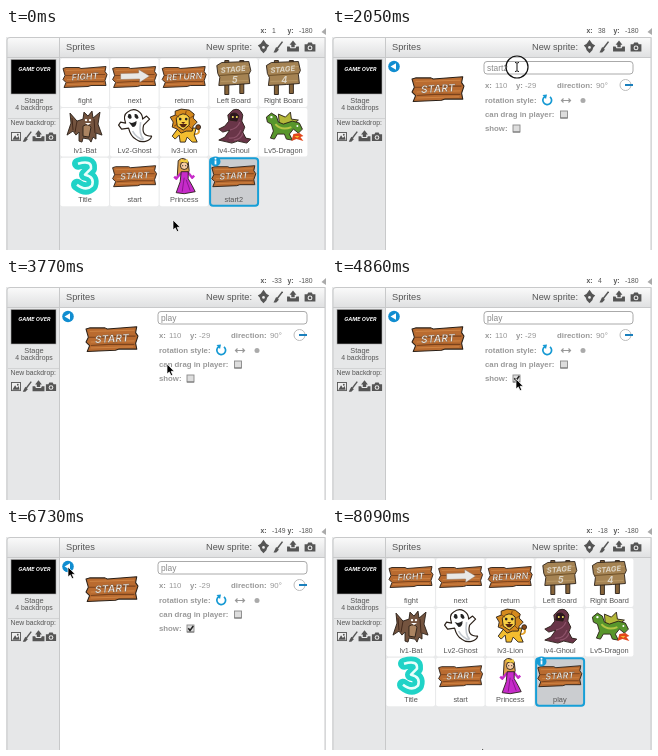
Write an HTML page that moves like this. It is 320 px wide and 222 px high and loops after 8.13 s.

```html
<!DOCTYPE html>
<html lang="en">
<head>
<meta charset="utf-8">
<title>Renaming a sprite</title>
<style>
html,body{margin:0;width:100%;height:100%;overflow:hidden;background:#fff}
svg{display:block;width:100vw;height:100vh;font:7.4px 'Liberation Sans',Arial,sans-serif;fill:#555}
.mid{text-anchor:middle}
.b{font-weight:bold}
.hand{font-family:Inter,sans-serif;font-weight:700;font-style:italic;text-anchor:middle}
.dim{font-size:7.8px;fill:#999}
.top{font-size:6.8px}
.art{stroke:#2a2018;stroke-width:.9;stroke-linejoin:round}
</style>
</head>
<body>
<svg id="stage" viewBox="0 0 320 222"></svg>
<script>
const LOOP = 8130;
const at = (x, y, body, k = 1) => `<g transform="translate(${x} ${y}) scale(${k})">${body}</g>`;
const text = (x, y, s, attrs = '') => `<text x="${x}" y="${y}" ${attrs}>${s}</text>`;
const rect = (x, y, w, h, attrs = '') => `<rect x="${x}" y="${y}" width="${w}" height="${h}" ${attrs}/>`;
const path = (d, fill, attrs = '') => `<path d="${d}" fill="${fill}" ${attrs}/>`;
const dot = (x, y, r, fill, attrs = '') => `<circle cx="${x}" cy="${y}" r="${r}" fill="${fill}" ${attrs}/>`;
const line = (d, color, width = 1) => path(d, 'none', `stroke="${color}" stroke-width="${width}"`);
const art = body => `<g class="art">${body}</g>`;

// Wooden boards
const plank = art(path('M-22-8L-19-9-6-9-4-8 21-10 20-5 22-2 20 4 21 9 6 9 3 10-21 11-19 6-22 3-20-1Z', '#b96b30')) +
  line('M-20-1L-6-1 5-2 20-2M-18 6L-3 5 19 5', '#7b431c', .9) +
  line('M-19-6L19-7M-18 3L19 2M-18 8L18 7', '#d58a48', .7);
const sign = word => plank + text(0, 3.2, word, 'class="hand" font-size="8.8" fill="#eeeae4" stroke="#6b4a30" stroke-width=".3" transform="rotate(-3)"');
const arrowSign = plank + path('M-14-3L4-3.5V-7L15-.5 5 6V2.5L-14 3Z', '#e8e8e6', 'stroke="#8c6b52" stroke-width=".5"');
const board = n => art(rect(-9, -16, 4, 34, 'fill="#86643a"') + rect(6, -16, 4, 33, 'fill="#86643a"') +
  path('M-17-11L-12-14 15-15 17-6 15-2 16 7 3 8-15 9-14 1-16-3Z', '#a58353')) +
  line('M-15-1L15-3', '#6d5029') + line('M-14-8L15-10M-13 5L14 4', '#bd9c69', .8) +
  text(0, -4.5, 'STAGE', 'class="hand" font-size="7.5" fill="#ddd5c6" transform="rotate(-5)"') +
  text(1, 6.5, n, 'class="hand" font-size="9" fill="#ddd5c6"');

// Characters, each drawn around its own centre
const bat = art(path('M-2-7L-8-5-15-13-14-3-18 9-12 5-9 9-6 6-6 15-3 16-2 12 4 13 6 16 8 11 11 13 11 7 17 9 13-2 15-14 8-8 7-15 3-10-1-14Z', '#74543f') +
  path('M-2 0Q3-3 6 1L4 11-2 10Z', '#ab8461')) +
  line('M-8-5L-10 6M9-7L10 7M-13-8L-12 4', '#43291c') +
  dot(1, -6, 1.2, '#fff') + dot(5, -6, 1.2, '#fff') + path('M0-3H6L3-1Z', '#fff');
const ghost = art(path('M-7-14C0-20 8-14 8-7L12-10 15-7 9-1C7 7 10 10 17 10 16 15 7 18 1 13-4 10-5 6-6 2L-13 3-16-1-14-4-9-3C-11-8-10-12-7-14Z', '#fff', 'stroke-width="1.2"')) +
  path('M-6-12q3-1 3 4-2 2-4-1zM0-12q3-1 4 4-2 2-4-1zM-6-4q4 2 8-1 0 6-4 6z', '#222') +
  line('M6-4Q4 8 9 13M-2 5Q2 12 9 14', '#c3c8ce', 1.6);
const lion = art(line('M8 8Q17 9 14 2', '#e0a02a', 2) + dot(14, 1, 2.4, '#8b4a16') +
  path('M-6 2L-12 10-9 13-5 9-4 16 1 16 3 11 8 16 13 16 10 9 12 2Z', '#f3bd2f') +
  path('M-3-17L5-16 10-12 9-8 13-4 9 0 8 5 2 5-3 7-7 3-12 1-11-4-14-9-9-11-9-15Z', '#d58a1d') +
  path('M-8-8Q-1-16 5-9L5-1-1 4-7 0Z', '#f8cf45')) +
  line('M-9-11L-5-9M2-15L1-11M10-11L6-8M-10 0L-7-2M8 3L5 0', '#7d4512') +
  dot(-4, -7, 1.3, '#222') + dot(2, -7, 1.3, '#222') + path('M-3-4H1L-1-2ZM-5-2Q-1 5 3-2Z', '#552611');
const ghoul = art(path('M-1-16Q6-19 9-11L8-5 11 1 9 6 12 12 17 13 13 17 4 15-2 17-15 14-9 11-4 4-11 6-15 3-9 0-5-5-6-11Z', '#693548') +
  path('M-3-12Q2-15 5-10L3-5-4-6Z', '#2c151e')) +
  line('M-4 4Q4 2 6-4M-5 12Q4 13 7 4M0 14Q8 13 9 7', '#8d5269', 1.3) +
  dot(-1, -9, 1, '#f2e25f') + dot(3, -9, 1, '#f2e25f');
const dragon = art(path('M-4-1L-5-12 2-9 7-14 8-7 15-6 5 2Z', '#b5b83a') +
  path('M-17-9L-12-13-7-10-5-4 0-2 9-5 16-3 19 3 15 7 10 3 6 8 9 14 3 13 1 8-6 8-9 13-13 12-10 5-12-2-16-4Z', '#58962c')) +
  line('M-8-2Q-2 5 8 1', '#b6c544', 2) + dot(-12, -9, 1.2, '#fff') + dot(14, 0, 1, '#fff') +
  path('M10 8L16 7 20 10 17 11 20 15 13 13 8 15Z', '#e2481c') + path('M11 10L16 10 14 12Z', '#f8b52b');
const curve = 'M-7-12Q7-16 6-7L0-1Q10 1 7 10 1 16-8 9';
const three = path(curve, 'none', 'stroke="#20d3c7" stroke-width="12" stroke-linejoin="round" stroke-linecap="round"') +
  path(curve, 'none', 'stroke="#e9fffc" stroke-width="2.6" stroke-linejoin="round"');
const princess = art(path('M-6-15Q-1-20 4-14L5-5 3 0-4-2-7 2Z', '#dca04b') +
  line('M-3-3L-8 3-10 1M4-3L8 2 10 0', '#c62bc9', 2.4) + path('M-3-4H4L4 3 8 10 11 16 0 18-8 17-4 6Z', '#c62bc9') +
  dot(0, -10, 3.8, '#f7cda4')) +
  path('M-4-14L-3-17 0-15 3-17 4-13Z', '#f2cf3c') + dot(-1.5, -10, .6, '#333') + dot(1.5, -10, .6, '#333') +
  line('M0 2L-2 16M2 4L6 15', '#8b168f', 1);

// Small grey tool icons
const elf = path('M0-7L3-3 6-1 4 1 3 4 0 7-3 4-4 1-6-1-3-3Z', '#555') + dot(0, 1, 1.4, '#eee');
const brush = line('M5-6L-1 2', '#555', 1.7) + path('M-2 0L1 3-2 6-5 6Z', '#555');
const upload = path('M-7 0H-4L-3 2H3L4 0H7V6H-7ZM-2 1V-2H-4L0-7 4-2H2V1Z', '#555');
const camera = path('M-6-3H-3L-2-5H2L3-3H6V5H-6Z', '#555') + dot(0, 1, 2.7, '#eee') + dot(0, 1, 1.5, '#555');
const picture = rect(-5, -5, 10, 9, 'fill="#eee" stroke="#555"') + path('M-4 3L-1-2 1 1 3-1 4 3Z', '#555') + dot(2, -2.5, 1, '#555');
const badge = dot(0, 0, 5, '#159bd5') + rect(-.9, -1.1, 1.8, 4, 'fill="#fff"') + dot(0, -2.7, 1, '#fff');

const sprites = [
  ['fight', sign('FIGHT')], ['next', arrowSign], ['return', sign('RETURN')], ['Left Board', board(5)], ['Right Board', board(4)],
  ['lv1-Bat', bat], ['Lv2-Ghost', ghost], ['lv3-Lion', lion], ['lv4-Ghoul', ghoul], ['Lv5-Dragon', dragon],
  ['Title', three], ['start', sign('START')], ['Princess', princess], ['', sign('START')]
];
const tiles = sprites.map(([name, body], i) => {
  const x = 79 + i % 5 * 49.6, y = 31 + (i / 5 | 0) * 49.6, chosen = i === 13;
  const box = chosen
    ? rect(x - 23.7, y, 48, 47.5, 'rx="3" fill="#cbcdd0" stroke="#179fd7" stroke-width="2"')
    : rect(x - 24.5, y - .5, 48.5, 48.5, 'rx="2" fill="#fff"');
  return box + at(x, y + 17.5, body) + text(x, y + 44.2, name, `class="mid"${chosen ? ' id="label"' : ''}`);
}).join('');

const check = (x, y) => rect(x, y, 7, 7, 'fill="#ddd" stroke="#888" stroke-width=".9"') +
  line(`M${x} ${y + 7}H${x + 7}`, '#777');
const bold = (x, y, s) => text(x, y, s, 'class="dim b"');
const plain = (x, y, s) => text(x, y, s, 'class="dim"');

const detail = rect(53.5, 30, 265.5, 192, 'fill="#fff"') +
  dot(62, 38.5, 5.8, '#118dd0') + path('M58.5 38.5L64 35.2V41.8Z', '#fff') +
  at(106, 60.5, sign('START'), 1.18) +
  rect(152, 33.5, 149, 12.5, 'rx="3" fill="#fff" stroke="#aaa"') +
  text(155, 42.5, '', 'id="field" font-size="8.4" fill="#888"') +
  bold(153, 60, 'x:') + plain(163, 60, '110') + bold(184, 60, 'y:') + plain(193, 60, '-29') +
  bold(225, 60, 'direction:') + plain(264, 60, '90°') +
  dot(293.5, 57, 5.5, '#fff', 'stroke="#bbb"') + line('M293 57H301', '#1b80bd', 2) +
  bold(153, 74.5, 'rotation style:') +
  line('M213 68.4A4.4 4.4 0 1 0 218 68.8', '#1599d3', 1.7) + path('M210.5 67L215 66.5 214 71Z', '#1599d3') +
  line('M230 72.5H238M231.5 70.5L229.5 72.5 231.5 74.5M236.5 70.5L238.5 72.5 236.5 74.5', '#999', 1.2) +
  dot(251, 72.5, 2.5, '#aaa') +
  bold(153, 89, 'can drag in player:') + check(228.5, 83) +
  bold(153, 103, 'show:') + check(181, 97) +
  path('M182.3 100.3L184 102.5 187.3 98', 'none', 'id="tick" stroke="#222" stroke-width="1.5"');

const stage = document.getElementById('stage');
stage.innerHTML = `<defs><linearGradient id="bar" x2="0" y2="1"><stop stop-color="#fafafa"/><stop offset="1" stop-color="#dfe0e1"/></linearGradient></defs>` +
  rect(0, 0, 320, 222, 'fill="#fff"') +
  rect(0, 9, 320, 213, 'fill="#e6e7e8"') +
  `<g id="grid">${rect(53.5, 30, 265.5, 192, 'fill="#e9eaeb"')}${tiles}${at(209.5, 133.5, badge)}</g>` +
  `<g id="detail">${detail}</g>` +
  rect(1.5, 9.5, 317.5, 20, 'fill="url(#bar)"') +
  line('M1 222V12Q1 9.5 4 9.5H319V222M53.5 10V222M1 29.5H319', '#c8c9ca') +
  line('M2 90.5H53', '#d2d3d4') +
  text(60, 22, 'Sprites', 'font-size="9.3"') + text(200, 22, 'New sprite:', 'font-size="9.2"') +
  at(257.5, 18.5, elf, .95) + at(272, 19, brush, .9) + at(287, 18.5, upload, .85) + at(304, 19, camera, .9) +
  rect(5, 31.5, 45, 34.5, 'fill="#000" stroke="#aaa" stroke-width=".6"') +
  text(28.5, 42.8, 'GAME OVER', 'class="hand" font-size="5.4" fill="#f4f4f4"') +
  text(28, 75, 'Stage', 'class="mid"') + text(28, 82, '4 backdrops', 'class="mid" font-size="6.9"') +
  text(4.5, 97.2, 'New backdrop:', 'font-size="6.8"') +
  at(10, 109, picture, .9) + at(21, 108.7, brush, .85) + at(32.5, 108.2, upload, .85) + at(45, 108.7, camera, .85) +
  text(254.5, 4.8, 'x:', 'class="b top"') + text(266, 4.8, '', 'id="pos" class="top"') +
  text(281.5, 4.8, 'y:', 'class="b top"') + text(293, 4.8, '-180', 'class="top"') +
  path('M320 0L315.5 4 320 7Z', '#aaa') +
  `<g id="pointer">
    <circle id="ring" fill="none" stroke="#111" stroke-width="1.2"/>
    <path id="arrow" d="M0 0V10L2.3 7.9 4 11.6 5.7 10.9 4.1 7.3H7.2Z" fill="#000" stroke="#fff" stroke-width=".7"/>
    <path id="beam" d="M-2-4.5Q0-4.5 0-3.5 0-4.5 2-4.5M0-3.5V3.5M-2 4.5Q0 4.5 0 3.5 0 4.5 2 4.5" fill="none" stroke="#111"/>
  </g>`;

const el = Object.fromEntries([...stage.querySelectorAll('[id]')].map(e => [e.id, e]));
const show = (e, on) => e.setAttribute('visibility', on ? 'visible' : 'hidden');

// time, pointer x, pointer y, x readout
const moves = [
  [0, 167, 192, 1], [100, 167, 192, 1], [680, 210, 132, 77], [1300, 210, 132, 77],
  [2000, 185, 39, 38], [3400, 185, 39, 38], [3770, 161, 86, -33], [4150, 184, 101, 4],
  [5050, 184, 101, 4], [5720, 62, 39, -149], [7500, 62, 39, -149], [8090, 150, 220, -18], [LOOP, 150, 220, -18]
];
const clicks = [780, 1950, 4450, 6400], CLICK = 300;

function pointerAt(t) {
  const i = moves.findIndex(m => m[0] > t), a = moves[i - 1], b = moves[i];
  const p = (t - a[0]) / (b[0] - a[0]), e = p * p * (3 - 2 * p);
  return a.map((v, k) => v + (b[k] - v) * e).slice(1);
}

function typed(t) {
  if (t < 2850) return 'start2'.slice(0, 6 - Math.max(0, Math.floor((t - 2350) / 80)));
  return 'play'.slice(0, Math.floor((t - 2850) / 110));
}

function draw(t) {
  const [x, y, readout] = pointerAt(t);
  const open = t >= 1000 && t < 6750;
  const typing = t > 2350 && t < 3400;
  const overField = open && x > 152 && x < 301 && y > 33 && y < 46;
  const click = clicks.find(c => t >= c && t < c + CLICK);
  const caret = t > 2100 && t < 4450 && Math.floor((t - 2100) / 500) % 2 === 0;

  show(el.grid, !open);
  show(el.detail, open);
  show(el.tick, open && t >= 4550);
  el.label.textContent = t < 3400 ? 'start2' : 'play';
  el.field.textContent = typed(t) + (caret ? '|' : '');
  el.pos.textContent = Math.round(readout);

  el.pointer.setAttribute('transform', `translate(${x} ${y})`);
  show(el.arrow, !overField && !typing);
  show(el.beam, overField && !typing);
  show(el.ring, click !== undefined);
  if (click !== undefined) el.ring.setAttribute('r', 9 + 6 * (t - click) / CLICK);
}

const start = performance.now();
function tick() {
  draw((performance.now() - start) % LOOP);
  requestAnimationFrame(tick);
}
tick();
</script>
</body>
</html>
```
